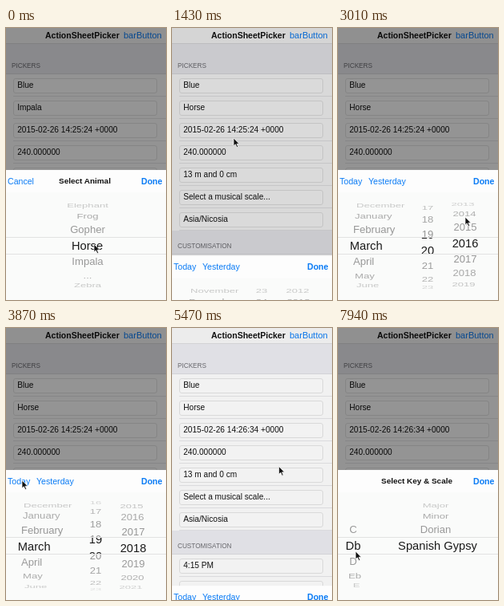
An HTML page for the animation above (7.99 s loop, 200 by 341 pixels).

```html
<!DOCTYPE html>
<html lang="en">
<head>
<meta charset="utf-8">
<title>ActionSheetPicker</title>
<style>
html, body { margin: 0; width: 100%; height: 100%; overflow: hidden; background: #fff; }
body { position: relative; font-family: "Liberation Sans", Arial, sans-serif; color: #111; }
#stage { position: absolute; left: 0; top: 0; width: 200px; height: 341px; overflow: hidden; background: #fdfdfd; }
#stage div, #stage span, #stage svg { position: absolute; box-sizing: border-box; }
span { white-space: pre; line-height: 16px; }
.bold { font-weight: bold; }
.blue { color: #0a7bf5; }
.nav { left: 0; top: 0; width: 200px; height: 20px; background: #f8f8f8; border-bottom: 1px solid #dcdcde; }
.nav span { top: 0.5px; }
.head { left: 0; width: 200px; background: #ebebf0; border-bottom: 1px solid #dcdce0; }
.head span { left: 7px; bottom: 1px; font-size: 8.2px; color: #6d6d72; }
.cell { left: 9px; width: 191px; height: 28px; border-bottom: 1px solid #e6e6e8; }
.field { left: 0; top: 4.5px; width: 180px; height: 19px; border: 1px solid #e4e4e4; border-radius: 3px; background: #fefefe; }
.field span { left: 4.2px; top: 0.5px; font-size: 10.15px; }
#dim { left: 0; top: 0; width: 200px; height: 341px; background: #000; }
#sheet { left: 0; top: 0; width: 200px; height: 164px; background: #fafbfa; }
.panel { left: 0; top: 0; width: 200px; height: 164px; }
.bar { left: 0; top: 0; width: 200px; height: 28px; background: #fdfdfd; }
.bar span { top: 5.5px; font-size: 10.6px; }
.band { left: 0; top: 84px; width: 200px; height: 22px; overflow: hidden; background: #fafbfa;
  border: solid #e2e2e2; border-width: 1px 0; }
.row { font-size: 13.1px; color: #929292; }
.band .row { font-size: 14.7px; color: #1a1a1a; }
#cursor { left: 0; top: 0; overflow: visible; }
</style>
</head>
<body>
<div id="stage">
  <div id="list"></div>
  <div id="dim"></div>
  <div id="sheet"></div>
  <svg id="cursor" width="8" height="12" viewBox="0 0 8 12">
    <path d="M0 0V9.8L2.3 7.8 4 11.6 5.6 10.9 4 7.3H7Z" fill="#111" stroke="#fff" stroke-width=".7"/>
  </svg>
</div>
<script>
const LOOP = 7990, SLIDE = 300, GLIDE = 430;
const ROW = 28, MID = 94.8, RADIUS = 57.4, STEP = 0.356;
const CLOSE = [700, 5235], OPEN = [1312, 6571], RESET = 3770;
const $ = id => document.getElementById(id);

// Eased 0 to 1, beginning at start and lasting span
function ramp(t, start, span) {
  const u = Math.min(1, Math.max(0, (t - start) / span));
  return 0.5 - 0.5 * Math.cos(Math.PI * u);
}

function add(parent, tag, cls, css = {}, text = '') {
  const el = document.createElement(tag);
  el.className = cls;
  Object.assign(el.style, css);
  el.textContent = text;
  parent.appendChild(el);
  return el;
}

// ---- Form behind the sheet ----
const list = $('list');
const nav = add(list, 'div', 'nav');
add(nav, 'span', 'bold', { left: '49px', fontSize: '10.5px' }, 'ActionSheetPicker');
add(nav, 'span', 'blue', { left: '147px', fontSize: '11px' }, 'barButton');

let y = 20;
function header(height, text) {
  add(add(list, 'div', 'head', { top: y + 'px', height: height + 'px' }), 'span', '', {}, text);
  y += height;
}
function field(text) {
  const cell = add(list, 'div', 'cell', { top: y + 'px' });
  y += ROW;
  return add(add(cell, 'div', 'field'), 'span', '', {}, text);
}
header(38, 'PICKERS');
const fields = ['Blue', 'Impala', '', '240.000000', '13 m and 0 cm',
  'Select a musical scale...', 'Asia/Nicosia'].map(field);
header(30, 'CUSTOMISATION');
['4:15 PM', ''].forEach(field);

// ---- Wheels ----
const mod = (i, n) => ((i % n) + n) % n;
const pick = names => i => names[i] || '';
const months = ['January', 'February', 'March', 'April', 'May', 'June', 'July',
  'August', 'September', 'October', 'November', 'December'];
const animals = ['Cat', 'Dog', 'Elephant', 'Frog', 'Gopher', 'Horse', 'Impala', '...', 'Zebra'];
const keys = ['C', 'Db', 'D', 'Eb', 'E', 'F', 'Gb', 'G', 'Ab', 'A', 'Bb', 'B'];
const scales = ['Major', 'Minor', 'Dorian', 'Spanish Gypsy'];

// x: side rows, big: chosen row, bend: sideways curve
// spin: one flick, by rows from a time over a span
const panels = [
  { left: ['Cancel'], title: 'Select Animal', wheels: [
    { label: pick(animals), x: 101.5, first: 5 }] },
  { left: ['Today', 'Yesterday'], title: '', wheels: [
    { label: i => months[mod(i, 12)], x: 19, big: 14.8, bend: 0.4, flush: true,
      first: 1, spin: { by: 1, at: 2110, span: 270 } },
    { label: i => String(mod(i - 1, 31) + 1), x: 111.5,
      first: 26, spin: { by: -7, at: 2390, span: 782 } },
    { label: String, x: 159.4, bend: -0.3,
      first: 2015, spin: { by: 3, at: 2790, span: 518 } }] },
  { left: [], title: 'Select Key & Scale', wheels: [
    { label: pick(keys), x: 19, bend: 0.4, first: 0, spin: { by: 1, at: 7580, span: 270 } },
    { label: pick(scales), x: 122, big: 124.5, first: 0, spin: { by: 3, at: 7010, span: 440 } }] }
];

for (const p of panels) {
  p.el = add($('sheet'), 'div', 'panel');
  const rows = add(p.el, 'div', 'panel');
  const band = add(p.el, 'div', 'band');
  const bar = add(p.el, 'div', 'bar');
  p.left.forEach((s, i) => add(bar, 'span', 'blue', { left: 2 + 36 * i + 'px' }, s));
  add(bar, 'span', 'bold', { left: '98.5px', fontSize: '9.95px', transform: 'translateX(-50%)' }, p.title);
  add(bar, 'span', 'bold blue', { left: '169px' }, 'Done');
  for (const w of p.wheels) {
    w.side = Array.from({ length: 9 }, () => add(rows, 'span', 'row', { top: MID - 8 + 'px' }));
    w.main = Array.from({ length: 3 }, () => add(band, 'span', 'row', { top: MID - 93 + 'px' }));
  }
}

function turn({ label, x, big = x, bend = 0, flush, first, spin, side, main }, t) {
  let v = first;
  if (spin) {
    const back = spin.at < RESET ? ramp(t, RESET, 680) : 0;
    v += spin.by * ramp(t, spin.at, spin.span) * (1 - back);
  }
  const base = Math.round(v);
  const place = (el, k, chosen) => {
    const d = base + k - v, angle = d * STEP, squash = Math.cos(angle);
    const show = Math.abs(d) < 3.7;
    el.textContent = show ? label(base + k) : '';
    if (!show) return;
    const drop = RADIUS * Math.sin(angle);
    el.style.left = (chosen ? big : x + bend * d * d) + 'px';
    el.style.opacity = chosen ? 1 : squash;
    el.style.transform = `translate(${flush ? 0 : -50}%, ${drop}px) scaleY(${squash})`;
  };
  side.forEach((el, i) => place(el, i - 4, false));
  main.forEach((el, i) => place(el, i - 1, true));
}

// ---- Pointer: each glide starts at a time and ends on a point ----
const home = [110, 271];
const glides = [
  [60, 183, 190],    // Done
  [600, 77, 138],    // date field
  [1600, 42, 270],   // month
  [2150, 112, 290],  // day
  [2570, 159, 237],  // year
  [3200, 20, 191],   // Today
  [4405, 186, 191],  // Done
  [5260, 78, 155],
  [5810, 78, 213],   // scale field
  [6720, 124, 250],  // scale
  [7350, 22, 280]    // key
];

function pointer(t) {
  let [px, py] = home;
  for (const [start, x, y] of glides) {
    const e = ramp(t, start, GLIDE);
    px += (x - px) * e;
    py += (y - py) * e;
  }
  return `translate(${px}px, ${py}px)`;
}

function put(el, text) {
  if (el.textContent !== text) el.textContent = text;
}

function draw(t) {
  const sum = times => times.reduce((s, at) => s + ramp(t, at, SLIDE), 0);
  const rise = 1 + sum(OPEN) - sum(CLOSE);
  $('sheet').style.transform = `translateY(${341 - 163 * rise}px)`;
  $('dim').style.opacity = 0.42 * rise;

  const shown = OPEN.filter(at => t >= at).length;
  panels.forEach((panel, i) => {
    panel.el.style.display = i === shown ? 'block' : 'none';
    if (i === shown) panel.wheels.forEach(w => turn(w, t));
  });
  put(fields[1], t < CLOSE[0] ? 'Impala' : 'Horse');
  put(fields[2], `2015-02-26 ${t < CLOSE[1] ? '14:25:24' : '14:26:34'} +0000`);
  $('cursor').style.transform = pointer(t);
}

const start = performance.now();
function tick() {
  draw((performance.now() - start) % LOOP);
  requestAnimationFrame(tick);
}
draw(0);
requestAnimationFrame(tick);
</script>
</body>
</html>
```
